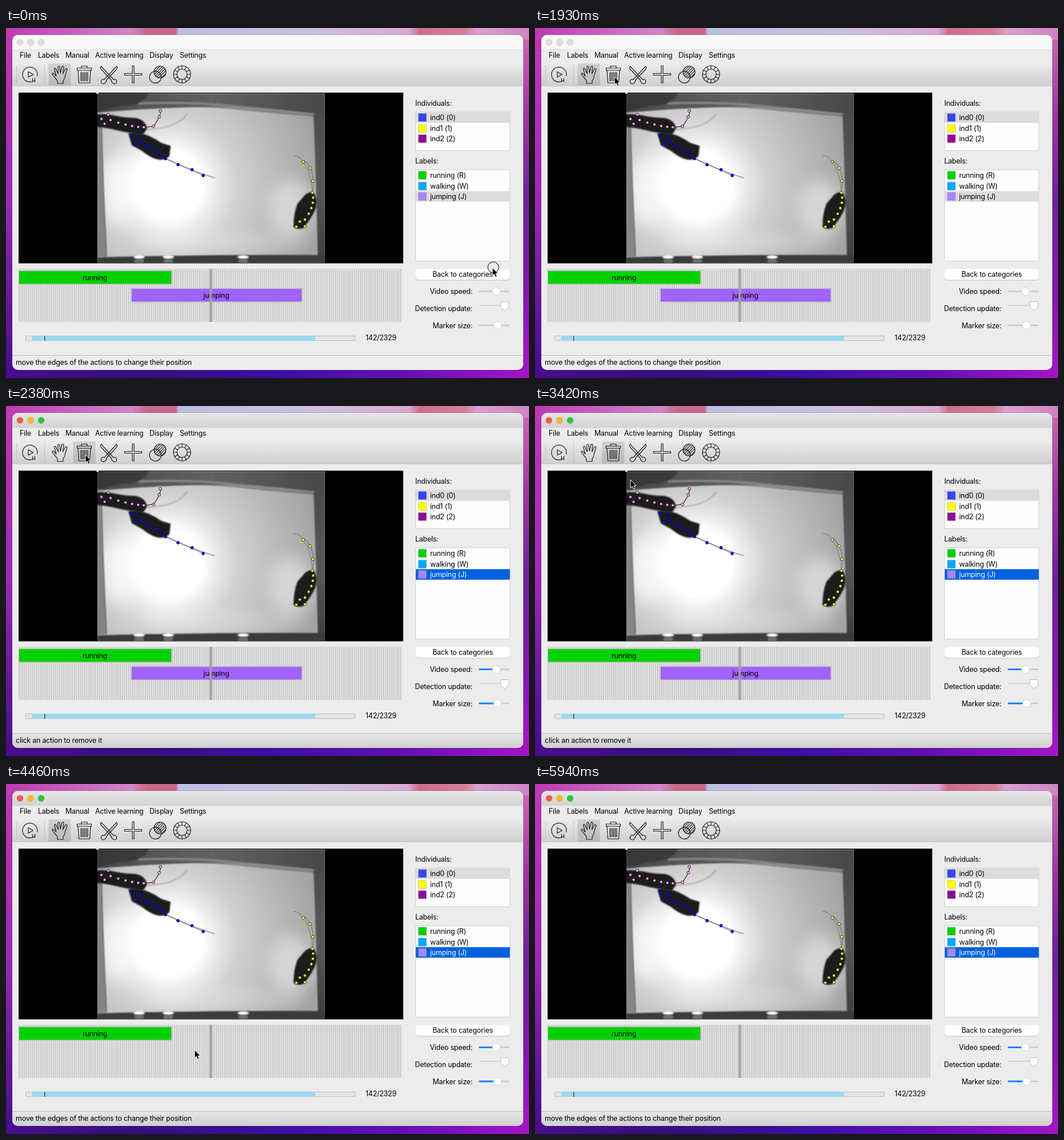
An HTML page for the animation above (6.24 s loop, 915 px wide and 612 px high).

```html
<!DOCTYPE html>
<html lang="en">
<head>
<meta charset="utf-8">
<title>Action annotation</title>
<style>
html, body { margin: 0; width: 100%; height: 100%; overflow: hidden; background: #5a14a8; }
svg { display: block; width: 915px; height: 612px; }
text { font: 12.4px Inter, "Open Sans", sans-serif; letter-spacing: -.2px; fill: #000; white-space: pre; }
.mid { text-anchor: middle; }
.end { text-anchor: end; }
.icon { fill: none; stroke: #222; stroke-width: 1.2; stroke-linejoin: round; stroke-linecap: round; }
.box { fill: #fdfdfd; stroke: #cfcfcf; }
.soft { filter: url(#soft); }
.haze { filter: url(#haze); }
.white { fill: #fff; }
</style>
</head>
<body>
<svg id="stage" viewBox="0 0 915 612"></svg>
<script>
const LOOP = 6240, STEP = LOOP / 42;
const stage = document.getElementById('stage');

const rect = (x, y, w, h, fill, more = '') =>
  `<rect x="${x}" y="${y}" width="${w}" height="${h}" fill="${fill}" ${more}/>`;
const oval = (x, y, rx, ry, fill, more = '') =>
  `<ellipse cx="${x}" cy="${y}" rx="${rx}" ry="${ry}" fill="${fill}" ${more}/>`;
const dot = (x, y, r, fill, more) => oval(x, y, r, r, fill, more);
const path = (d, fill, more = '') => `<path d="${d}" fill="${fill}" ${more}/>`;
const line = (d, color, w, more = '') =>
  path(d, 'none', `stroke="${color}" stroke-width="${w}" ${more}`);
const text = (x, y, s, cls = '', more = '') =>
  `<text x="${x}" y="${y}" class="${cls}" ${more}>${s}</text>`;
const group = (id, s) => `<g id="${id}">${s}</g>`;
const repeat = (n, f) => Array.from({ length: n }, (_, i) => f(i)).join('');

// Evenly spaced colours, or [offset, colour] pairs.
const stops = list => list.map((c, i) => Array.isArray(c) ? c : [i / (list.length - 1), c])
  .map(([at, c]) => `<stop offset="${at}" stop-color="${c}"/>`).join('');
const across = (id, ...list) => `<linearGradient id="${id}">${stops(list)}</linearGradient>`;
const down = (id, ...list) => `<linearGradient id="${id}" x2="0" y2="1">${stops(list)}</linearGradient>`;

const defs = `<defs>
  ${across('top', '#c038b4', [.24, '#cf86c8'], [.27, '#c9688c'], [.325, '#c9688c'], [.33, '#bcbfe2'],
    [.6, '#cdbfe0'], [.77, '#d8a9d2'], [.79, '#cf6c88'], [.88, '#d4809c'], [.9, '#d8a0d0'], [1, '#cf84c4'])}
  ${across('bottom', '#4a0c90', '#35107f', '#3a10a0', '#6310b0', '#a514c8')}
  ${down('left', '#c038b4', '#b42fb4', '#9c29b8', '#6c1aa0', '#430c8c')}
  ${down('right', '#cf6cb4', '#a035a4', '#6d209a', '#8417b4', '#ab14ca')}
  ${down('title', '#e6e6e6', '#d2d2d2')}
  ${down('tools', '#ebebeb', [.35, '#e0e0e0'], [1, '#cfcfcf'])}
  ${down('foot', '#e6e6e6', '#cecece')}
  ${across('roof', '#484848', '#626262', '#484848')}
  ${down('wall', '#4c4c4c', '#585858', '#3c3c3c')}
  <radialGradient id="floor" gradientUnits="userSpaceOnUse" cx="285" cy="275" r="270">
    ${stops([[.22, '#fff'], [.3, '#ececec'], [.45, '#d0d0d0'], [.7, '#bababa'], [1, '#a2a2a2']])}
  </radialGradient>
  <filter id="soft"><feGaussianBlur stdDeviation="1.2"/></filter>
  <filter id="haze" x="-1" y="-1" width="3" height="3"><feGaussianBlur stdDeviation="14"/></filter>
  <pattern id="hatch" width="3.2" height="3.2" patternUnits="userSpaceOnUse" patternTransform="rotate(45)">
    <path d="M1 0V4" stroke="#222" stroke-width="1.2"/></pattern>
  <clipPath id="frame"><rect x="160" y="114" width="398" height="297"/></clipPath>
  <clipPath id="shell"><rect x="11" y="12" width="894" height="586" rx="10"/></clipPath>
</defs>`;

const desktop = rect(0, 0, 915, 612, 'url(#left)') + rect(890, 0, 25, 612, 'url(#right)') +
  rect(0, 0, 915, 20, 'url(#top)') + rect(0, 590, 915, 22, 'url(#bottom)') +
  rect(10.5, 11.5, 895, 587, '#200040', 'rx="10.5" opacity=".35"');

const lights = colors => colors.map((c, i) =>
  dot(24.5 + 18.5 * i, 25, 5.6, c, 'stroke="#000" stroke-opacity=".1"')).join('');

const chrome = '<g clip-path="url(#shell)">' + rect(11, 12, 894, 586, '#ececec') +
  group('idleBars', rect(11, 12, 894, 26, '#f8f8f8') + lights(Array(3).fill('#dedede'))) +
  group('liveBars', rect(11, 12, 894, 26, 'url(#title)') + rect(11, 573, 894, 25, 'url(#foot)') +
    lights(['#fe5850', '#fdb927', '#28c73f'])) +
  rect(11, 62, 894, 39, 'url(#tools)') +
  line('M11 38H905', '#dadada', 1) + line('M11 101H905M11 572.5H905', '#bcbcbc', 1) + '</g>';

const menu = [[24, 'File'], [56, 'Labels'], [104, 'Manual'], [156, 'Active learning'],
  [251, 'Display'], [304, 'Settings']].map(([x, s]) => text(x, 52, s)).join('');

const blade = 'M172 90L193.5 67Q196 69 193.5 72L175.5 91.5M172 90A4 4 0 1 0 174 95Q176.5 93 175.5 91.5';
const icons = line('M18.5 67V97M67.5 64V99', '#8c8c8c', 1, 'stroke-dasharray="1 2"') +
  group('pressed', rect(74.5, 62, 39, 38.5, '#000', 'opacity=".11"')) +
  `<g class="icon">
  <path d="M50 91.5A13 13 0 1 1 54.6 84M39 76.5V86L47.5 81.2ZM46.5 88V94M50.5 88V94"/>
  <path d="M90 97V92C87 88 84 85 81 81Q80.5 78.5 83 79L88 84 84.5 72Q85 69.5 87 71L91.5 80 90.8 68Q92.5 65 94 68L95.2 79 98 67.5Q100 65.5 101 68L99.5 80 104 71.5Q106.5 70 107 72.5L103.5 83Q103 89 100 92V97Z"/>
  <path d="M124.5 70H149.5V74H124.5ZM132 70V66.5H142V70M126 74L127.5 96H146.5L148 74"/>
  ${repeat(3, i => rect(131 + 4.8 * i, 78, 2.4, 14, 'none'))}
  <path d="${blade}"/><path d="${blade}" transform="matrix(-1 0 0 1 360 0)"/>
  <path d="M221 66H224V79.5H237.5V82.5H224V96H221V82.5H207.5V79.5H221Z"/>
  ${dot(261.3, 86, 10.3, 'none') + dot(269.5, 77, 10.5, 'url(#hatch)')}
  ${dot(308, 81, 15, 'none') + dot(308, 81, 9, 'none')}
  ${repeat(12, i => `<path d="M308 72V66" transform="rotate(${30 * i} 308 81)"/>`)}
  </g>`;

// n points evenly along the curve from a to c, bent towards b.
const chain = (n, a, b, c) => Array.from({ length: n }, (_, i) => {
  const u = i / (n - 1), v = 1 - u;
  return [0, 1].map(k => v * v * a[k] + 2 * u * v * b[k] + u * u * c[k]);
});
const markers = (fill, edge, head, spine, tail) =>
  [...head, ...chain(6, ...spine), ...chain(3, ...tail)]
    .map(([x, y]) => dot(x, y, 2.4, fill, `stroke="${edge}"`)).join('');

const SOFT = 'class="soft"';
const room = rect(160, 114, 398, 297, 'url(#floor)') +
  oval(195, 285, 35, 60, '#fff', 'class="haze" opacity=".6"') +
  oval(500, 315, 40, 50, '#fff', 'class="haze" opacity=".45"') +
  oval(380, 375, 150, 15, '#fff', 'class="haze" opacity=".25"') +
  path('M160 114H558V154Q470 140 390 138T160 148Z', 'url(#roof)', SOFT) +
  line('M232 132Q320 128 400 137T540 151', '#858585', 4, SOFT) +
  line('M225 138Q330 134 400 141T540 154', '#5a5a5a', 1.4, SOFT) +
  path('M160 114H250Q240 136 200 136L160 146Z', '#333', 'class="soft" opacity=".7"') +
  path('M538 150H558V411H546Q542 250 538 150Z', 'url(#wall)', SOFT) +
  path('M160 172H167Q170 290 176 400H160Z', '#858585', SOFT) +
  line('M167 172Q170 290 176 398', '#5a5a5a', 1.6, SOFT) +
  path('M160 401Q360 396 558 397V412H160Z', '#3b3b3b', SOFT) +
  [233, 284, 415].map(x => oval(x, 400.5, 10, 3, '#fff', SOFT) +
    rect(x - 8, 404, 16, 7, '#909090', 'class="soft" opacity=".6"')).join('');

const animals =
  path('M158 151C180 148 200 158 225 157Q244 160 247 176L240 186Q215 184 195 179T158 173Z', '#1a1a1a', SOFT) +
  path('M214 184Q228 181 243 186T272 201L288 206 286 224Q278 232 266 230T238 215L220 205Z', '#1c1c1c', SOFT) +
  path('M523 292Q532 284 540 290Q547 305 540 320T520 350Q510 353 503 348Q503 324 510 307Z', '#1e1e1e', SOFT) +
  line('M244 177Q300 176 317 150', '#888', 2, 'class="soft" opacity=".6"') +
  line('M241 173.5L258 172Q272 152 270 145', '#444', 1.4) +
  line('M279 228Q315 246 365 262', '#b4b4b4', 2.4) + line('M279 228.5Q315 244 345 258', '#777', 1.1) +
  line('M536 288Q534 258 524 240T503 223', '#8a8a8a', 1.4) +
  line('M536 288Q541 262 532 245T520 234', '#777', 1.2) +
  markers('#ffb4ff', '#401040', [[167, 159], [179, 151.5], [172.5, 167.5]],
    [[183, 161], [218, 173], [241, 173.5]], [[258, 172], [272, 152], [270, 145]]) +
  markers('#0a0aff', '#000080', [[219, 188.5], [233, 192], [225, 203]],
    [[236, 201], [258, 211], [279, 228.5]], [[301, 239], [328, 247], [345, 258]]) +
  markers('#ffff50', '#404000', [[508, 347.5], [523, 347], [514, 338.5]],
    [[523, 335], [542, 309], [536, 288]], [[537, 267.5], [535.5, 239], [520, 234]]);

const video = rect(22, 113, 673, 298.5, '#000') +
  `<g clip-path="url(#frame)">${room + animals}</g>` + rect(158, 113, 4, 2, '#ddd');

const action = (x, y, w, fill, s) =>
  rect(x, y, w, 23, fill, 'stroke="#b4b4b4"') + text(x + w / 2 - .5, y + 16.2, s, 'mid');

const timeline = rect(22, 421, 671, 93, '#ebebeb') +
  line('M22 467.5H693', '#c2c2c2', 93, 'stroke-dasharray="1.7 1.655"') +
  action(22.5, 424.8, 267, '#00d100', 'running') +
  group('jump', action(219.5, 455.8, 298, '#a162ff', 'jumping')) +
  rect(356.4, 421, 4, 93, '#a0a0a0') +
  rect(34.5, 538.5, 576, 8, '#e6e6e6', 'stroke="#bcbcbc"') + rect(45.5, 538.5, 495.5, 8, '#9adaf2') +
  rect(67, 538, 1.6, 9, '#555') + text(629, 546, '142/2329') + text(17, 589, '', '', 'id="status"');

const rows = (top, items) => items.map(([fill, s, id = ''], i) => {
  const y = top + Math.round(18.6 * i);
  return rect(721.5, y + 2.5, 14, 14, fill, `id="${id}Swatch" stroke="#888" stroke-opacity=".4"`) +
    text(742, y + 13.6, s, '', `id="${id}Text"`);
}).join('');

const slider = (y, x) => line(`M828 ${y}H880`, '#cacaca', 2.6, 'stroke-linecap="round"') +
  line(`M828.5 ${y}H${x}`, '#0a84ff', 2.8, 'class="live" stroke-linecap="round"') +
  dot(x, y, 7, '#fff', 'stroke="#c6c6c6" stroke-width=".8"');

const panel = text(716, 136, 'Individuals:') + rect(716.5, 147, 165, 67.5, '', 'class="box"') +
  rect(717, 147.5, 164.5, 18.3, '#dcdcdc') +
  rows(147, [['#3344ff', 'ind0 (0)', 'first'], ['#ffff00', 'ind1 (1)', 'second'], ['#990099', 'ind2 (2)', 'third']]) +
  text(716, 236.5, 'Labels:') + rect(716.5, 248, 165, 159.5, '', 'class="box"') +
  rect(717, 285.3, 164.5, 18.4, '#dcdcdc', 'id="chosen"') +
  rows(248, [['#00d100', 'running (R)', 'run'], ['#00a8ff', 'walking (W)', 'walk'], ['#a785ff', 'jumping (J)', 'jump']]) +
  rect(716, 421.5, 166, 20, '#000', 'rx="5" opacity=".16"') + rect(716.3, 421.3, 165.4, 19, '#fff', 'rx="5"') +
  text(799, 435.3, 'Back to categories', 'mid') +
  ['Video speed:', 'Detection update:', 'Marker size:']
    .map((s, i) => text(816, 465 + 29.8 * i, s, 'end')).join('') +
  slider(460.5, 858) + slider(520, 860) + line('M828 485H866', '#cacaca', 1.6) +
  path('M867 478.5H878.5Q880 478.5 880 480V488L872.7 494.5 865.5 488V480Q865.5 478.5 867 478.5Z', '#fff', 'stroke="#b8b8b8"');

const pointer = group('cursor', group('ring', dot(1.5, -.5, 9.5, 'none', 'stroke="#222" stroke-width="1.1"')) +
  path('M0 0V14.2L3.2 11.3 5.4 16.4 8 15.3 5.8 10.4H10Z', '#000', 'stroke="#fff"'));

stage.innerHTML = defs + desktop + chrome + menu + icons + video + timeline + panel + pointer;

// Pointer strokes, in steps: leave, arrive, end point.
const START = [851, 419];
const strokes = [[0, 4, 216, 196], [5, 10, 131, 77], [10, 13, 139, 85], [22, 23, 167, 129],
  [23, 26, 387, 440], [26, 28, 330, 465], [30, 34, 331, 463], [34, 36, 781, 559], [38, 39, 829, 592]];
const FOCUS = 15, TRASH = 16, REMOVED = 30, GONE = 40;

function pointerAt(step) {
  let [x, y] = START;
  for (const [leave, arrive, toX, toY] of strokes) {
    const u = Math.min(1, Math.max(0, (step - leave) / (arrive - leave)));
    const ease = u * u * (3 - 2 * u);
    x += (toX - x) * ease;
    y += (toY - y) * ease;
  }
  return [x, y];
}

const $ = id => document.getElementById(id);
const show = (el, on) => { el.style.display = on ? '' : 'none'; };

function draw(step) {
  const live = step >= FOCUS, deleting = step >= TRASH && step < REMOVED;
  const [x, y] = pointerAt(step);
  $('cursor').setAttribute('transform', `translate(${x} ${y})`);
  show($('cursor'), step < GONE);
  show($('ring'), step < 1);
  show($('liveBars'), live);
  show($('idleBars'), !live);
  document.querySelectorAll('.live').forEach(el => show(el, live));
  $('chosen').setAttribute('fill', live ? '#0060df' : '#dcdcdc');
  $('jumpText').setAttribute('class', live ? 'white' : '');
  $('thirdSwatch').setAttribute('fill', live ? '#8a0f96' : '#990099');
  $('pressed').setAttribute('transform', `translate(${deleting ? 43 : 0})`);
  show($('jump'), step < REMOVED);
  $('status').textContent = !deleting ? 'move the edges of the actions to change their position'
    : y > 455 ? 'jumping' : 'click an action to remove it';
}

function tick() {
  // The small lead absorbs the rounding of step times to 10 ms.
  draw(Math.floor((performance.now() % LOOP + 5) / STEP) % 42);
  requestAnimationFrame(tick);
}
tick();
</script>
</body>
</html>
```
